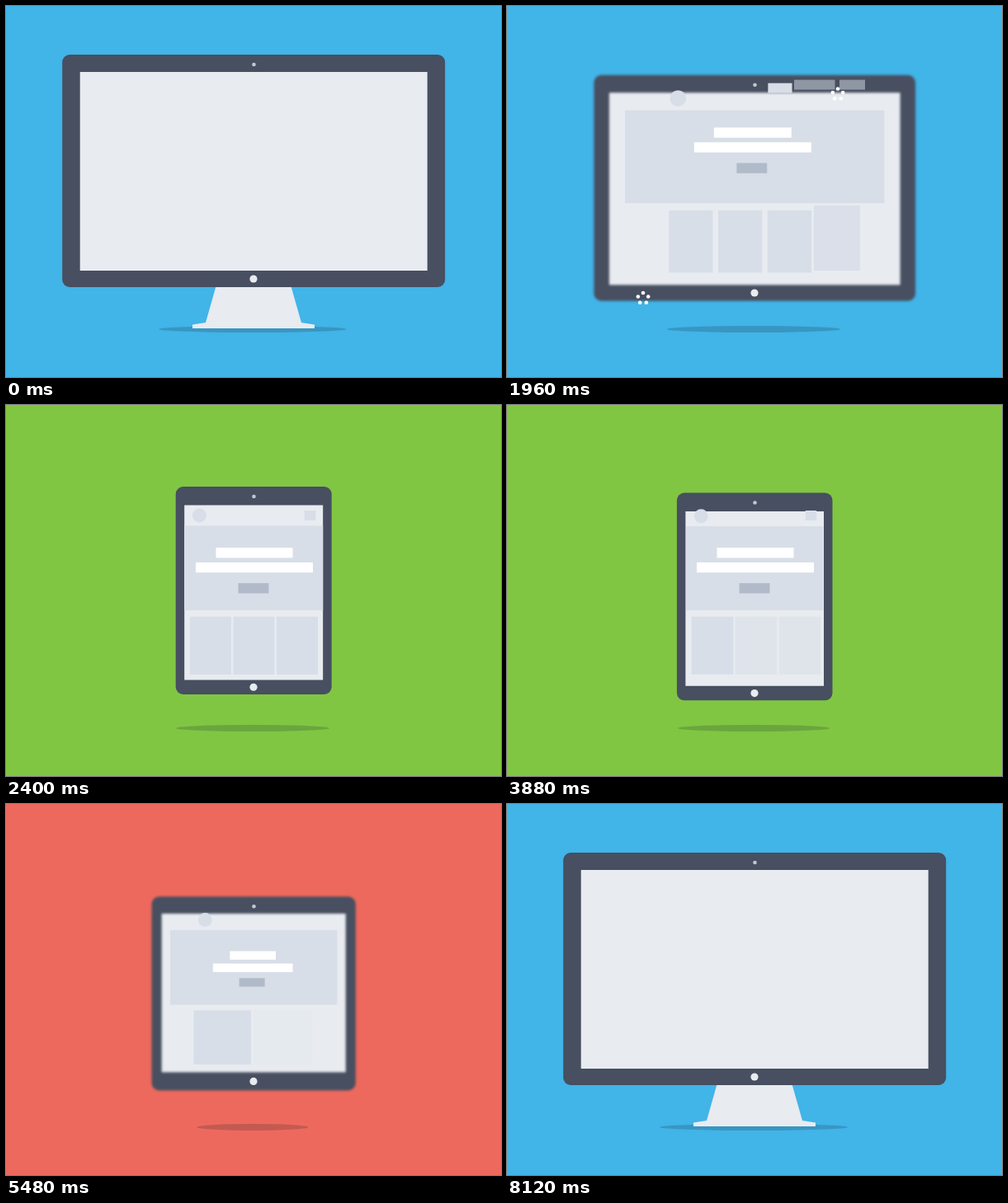
Recreate the animation shown at these times as an HTML page with a canvas. Size 600 by 450 pixels, loop 8660 ms.

```html
<!DOCTYPE html>
<html lang="en">
<head>
<meta charset="utf-8">
<title>Responsive layout</title>
<style>
  html, body { margin: 0; width: 100%; height: 100%; overflow: hidden; background: #41b4e8; }
  canvas { display: block; width: 600px; height: 450px; }
</style>
</head>
<body>
<canvas id="stage" width="600" height="450"></canvas>
<script>
const ctx = document.getElementById('stage').getContext('2d');
const LOOP = 8660, STEP = 40, CENTER = 300.2, FLOOR = 391;
const SHELL = '#474f60', PAPER = '#e8ebf0', BLOCK = '#d8dee8', BUTTON = '#b1bac9';

const clamp = v => Math.max(0, Math.min(1, v));
const ramp = (t, a, b) => clamp((t - a) / (b - a));
const sine = p => (1 - Math.cos(Math.PI * p)) / 2;
const easeOut = p => 1 - (1 - p) ** 3;
const bump = p => Math.sin(Math.PI * p);
const mix = (a, b, p) => a.map((v, i) => v + (b[i] - v) * p);

// Boxes are [left, top, right, bottom]
const bar = (mid, top, w, h) => [mid - w / 2, top, mid + w / 2, top + h];
const fromLeft = ([l, t, r, b], g) => [l, t, l + (r - l) * g, b];
const fromTop = ([l, t, r, b], g) => [l, t, r, t + (b - t) * g];
const fromMiddle = ([l, t, r, b], g) => bar((l + r) / 2, t, (r - l) * g, b - t);

const desktop = {
  bg: [65, 180, 232], w: 464, top: 59, bottom: 341, side: 21.5, brow: 21, chin: 20, shade: 228,
  head: 32, nav: 114, hero: 120, mid: 297.8, type: 12.3, title: 94, measure: 142, lead: 2.05,
  left: 178, card: 55.5, gap: 9.2, foot: 0
};
const tablet = {
  bg: [128, 198, 66], w: 189, top: 99, bottom: 351, side: 10.5, brow: 22.5, chin: 17.5, shade: 186,
  head: 25, nav: 67, hero: 102.5, mid: 301, type: 12.3, title: 93, measure: 142, lead: 2.05,
  left: 223, card: 50, gap: 2.5, foot: 6.5
};
const phone = {
  bg: [238, 105, 93], w: 100.5, top: 132.5, bottom: 336, side: 5.7, brow: 20.5, chin: 23.5, shade: 109,
  head: 21, nav: 32.3, hero: 75.5, mid: 300, type: 9.2, title: 33, measure: 70, lead: 1.45,
  left: 261, card: 79, gap: 0, foot: 0
};

function layout(d) {
  const isWide = d === desktop;
  const top = d.top + d.brow, bottom = d.bottom - d.chin, width = d.w - 2 * d.side;
  const heroTop = top + d.head, heroEnd = heroTop + d.hero;
  const navY = top + d.head / 2, logo = d.head * .68;
  const title = heroTop + (d.hero - d.type * (2.45 + d.lead)) / 2 + 3;
  const line = title + d.type * 1.45;
  return {
    bg: d.bg,
    shell: bar(CENTER, d.top, d.w, d.bottom - d.top),
    screen: bar(CENTER, top, width, bottom - top),
    dots: [d.top + 12, d.bottom - d.chin / 2],
    shadow: bar(299, 388, d.shade, 8),
    logo: bar(301.5 - d.nav, navY - logo / 2, logo, logo),
    menu: isWide ? bar(326.5, navY - 6.5, 31, 12) : bar(301.5 + d.nav, navY - 6, 13.5, 12),
    hero: bar(CENTER, heroTop, width, d.hero),
    title: bar(d.mid, title, d.title, d.type),
    line: bar(d.mid, line, d.measure, d.type),
    action: bar(d.mid - 1, line + d.type * d.lead, d.type * 3, d.type),
    cards: [0, 1, 2, 3].map(i => {
      const x = d.left + i * (d.card + d.gap);
      return [x, heroEnd + d.head * .31, x + d.card, bottom - d.foot];
    })
  };
}
const LAYOUTS = [desktop, tablet, phone].map(layout);

// Each change of device has one start; parts lag behind it when shrinking / growing
const START = [1600, 3760, 5320];
const LAG = {
  frame: [200, 0], page: [153, 15], cards: [158, 0],
  text: [340, 8], nav: [263, 120], shadow: [153, 46], color: [360, 300]
};

function progress(t, part, i) {
  const growing = i === 2;
  const lag = LAG[part][+growing] * (i === 1 ? .5 : 1);
  const from = START[i] + lag;
  return ramp(t, from, from + (growing ? 365 : 460));
}

function pose(t, part, pick) {
  return START.reduce((now, _, i) =>
    mix(now, pick(LAYOUTS[(i + 1) % 3]), sine(progress(t, part, i))), pick(LAYOUTS[0]));
}

// Opacity of a part that goes out and later comes back
const presence = (t, out, back) =>
  1 - ramp(t, out, out + 160) + sine(ramp(t, back, back + 220));

// The content enters and leaves along the same mirrored curve
function grow(t, delay, span = 400) {
  const v = t < 4000 ? t - 80 : 8120 - t;
  return easeOut(clamp((v - delay) / span));
}

function box([l, t, r, b], color, alpha = 1) {
  ctx.globalAlpha = clamp(alpha);
  ctx.fillStyle = color;
  ctx.fillRect(l, t, r - l, b - t);
  ctx.globalAlpha = 1;
}

function oval([l, t, r, b], color, scale = 1) {
  ctx.fillStyle = color;
  ctx.beginPath();
  ctx.ellipse((l + r) / 2, (t + b) / 2, (r - l) / 2 * scale, (b - t) / 2 * scale, 0, 0, Math.PI * 2);
  ctx.fill();
}

const dot = (x, y, r, color) => oval([x - r, y - r, x + r, y + r], color);

function drawStand(t, bottom) {
  const shown = 1 - sine(ramp(t, START[0], START[0] + 200))
    + sine(ramp(t, START[2] + 380, START[2] + 660));
  const h = Math.min(shown, (FLOOR - bottom) / 50);
  if (h <= 0) return;
  ctx.save();
  ctx.translate(300, bottom);
  ctx.scale(1, h);
  ctx.fillStyle = PAPER;
  ctx.beginPath();
  const side = [[45.5, -1], [58, 43], [74, 45.5], [74, 50]];
  for (const [x, y] of side) ctx.lineTo(x, y);
  for (const [x, y] of side.reverse()) ctx.lineTo(-x, y);
  ctx.fill();
  ctx.restore();
}

function drawDevice(t) {
  const drop = START.reduce((sum, s) => sum + 14 * bump(ramp(t, s, s + 680)), 0);
  const blur = 1.8 * Math.max(...START.map((_, i) => bump(progress(t, 'frame', i))));
  const shell = pose(t, 'frame', s => s.shell);
  const [l, top, r, b] = shell;

  oval(pose(t, 'shadow', s => s.shadow), 'rgba(20,30,40,.2)');
  drawStand(t, b + drop);

  ctx.save();
  ctx.translate(0, drop);
  if (blur > .05) ctx.filter = `blur(${blur.toFixed(2)}px)`;
  ctx.fillStyle = SHELL;
  ctx.beginPath();
  ctx.roundRect(l, top, r - l, b - top, 9);
  ctx.fill();
  box(pose(t, 'frame', s => s.screen), PAPER);
  ctx.filter = 'none';
  const [lens, home] = pose(t, 'frame', s => s.dots);
  dot(300.5, lens, 2.3, '#c3c8d0');
  dot(300, home, 4.6, PAPER);
  ctx.restore();
}

function drawContent(t) {
  box(fromLeft(pose(t, 'page', s => s.hero), grow(t, 0, 640)), BLOCK);
  oval(pose(t, 'page', s => s.logo), BLOCK, grow(t, 40));

  // The last card only exists on the desktop and stays put while it fades
  for (let i = 0; i < 4; i++) {
    const place = i < 3 ? pose(t, 'cards', s => s.cards[i]) : LAYOUTS[0].cards[3];
    const out = i < 3 ? START[1] + 40 : START[0] + 340;
    const alpha = i ? presence(t, out, START[2] + 100 * i) : 1;
    box(fromTop(place, grow(t, i * 130, 480)), BLOCK, alpha);
  }

  const links = presence(t, 1880, 5680);
  box(fromLeft([348, 89.5, 397.5, 101.5], grow(t, 180)), BLOCK, links);
  box(fromLeft([403, 89.5, 434, 101.5], grow(t, 240)), BLOCK, links);
  box(fromLeft(pose(t, 'nav', s => s.menu), grow(t, 120)), BLOCK, presence(t, START[2], 5640));

  ['title', 'line', 'action'].forEach((key, i) => {
    const place = pose(t, 'text', s => s[key]);
    box(fromMiddle(place, grow(t, 240 + 80 * i)), key === 'action' ? BUTTON : '#fff');
  });
}

function drawBurst(t, x, y) {
  const p = ramp(t, 1880, 2040);
  for (let i = 0; i < 5; i++) {
    const a = i * Math.PI * .4 - Math.PI / 2;
    dot(x + Math.cos(a) * 13 * p, y + Math.sin(a) * 13 * p, 2.3 * bump(p), '#fff');
  }
}

function draw(t) {
  const bg = pose(t, 'color', s => s.bg).map(Math.round);
  box([0, 0, 600, 450], `rgb(${bg})`);
  drawDevice(t);
  drawContent(t);
  drawBurst(t, 401, 107);
  drawBurst(t, 165, 354.5);
}

const start = performance.now();
function tick() {
  const t = (performance.now() - start) % LOOP;
  draw(Math.floor(t / STEP) * STEP);
  requestAnimationFrame(tick);
}
tick();
</script>
</body>
</html>
```
